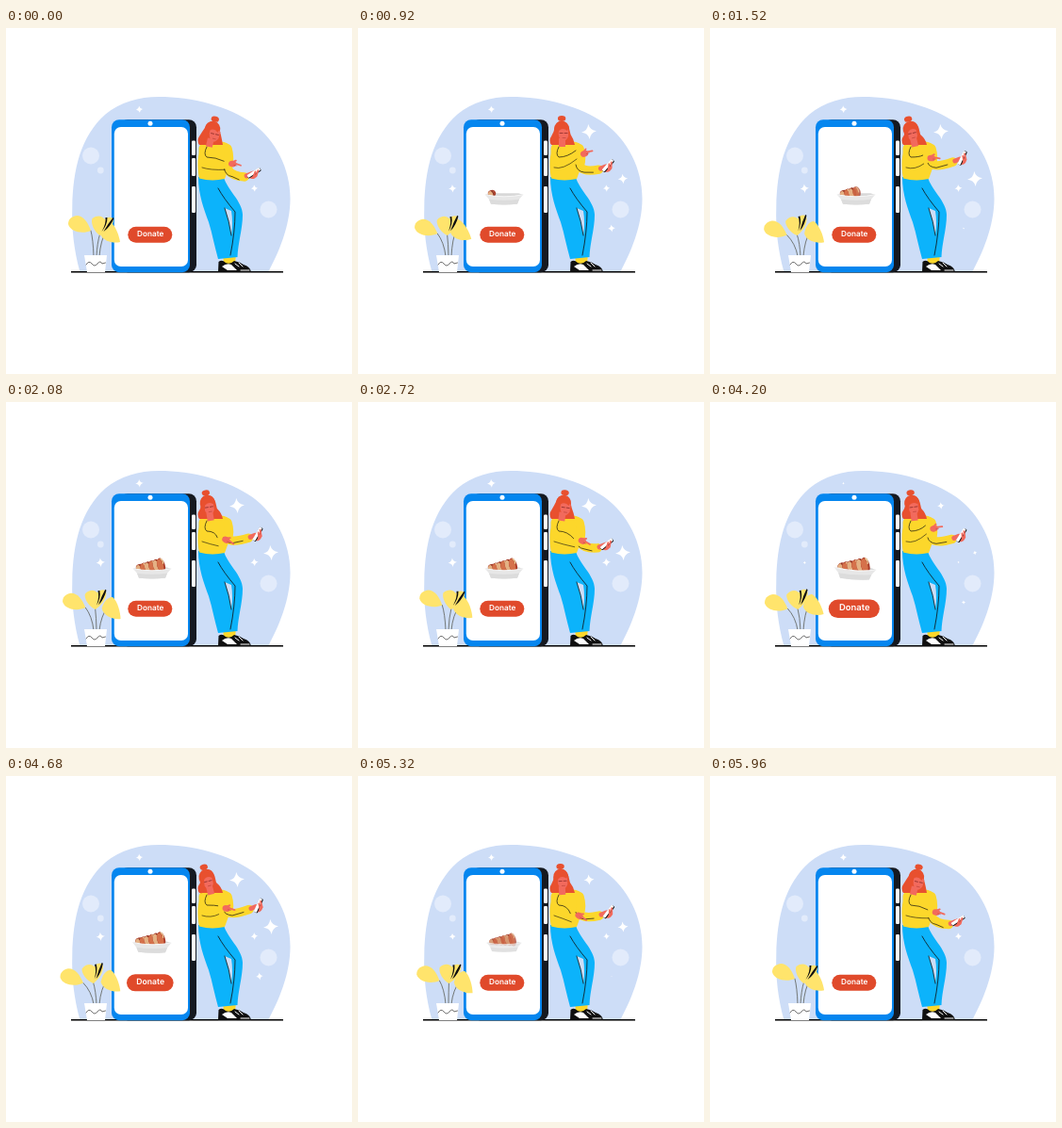
Recreate the animation shown at these times as an HTML page with a canvas. Size 367 by 367 pixels, loop 6 s.

```html
<!DOCTYPE html>
<html lang="en">
<head>
<meta charset="utf-8">
<title>Donate</title>
<style>
html, body { margin: 0; width: 100%; height: 100%; overflow: hidden; background: #fff; }
canvas { display: block; width: 367px; height: 367px; }
</style>
</head>
<body>
<canvas id="stage"></canvas>
<script>
const SIZE = 367, LOOP = 6000;
const canvas = document.getElementById('stage');
const ratio = window.devicePixelRatio || 1;
canvas.width = canvas.height = Math.round(SIZE * ratio);
const g = canvas.getContext('2d');

const BLUE = '#0586ef', DARK = '#151920', INK = '#101010', RED = '#e04a2b', SKY = '#cdddf7', HALO = '#e2ebfb';
const YELLOW = '#fcd72b', LEAF = '#ffe46c', SKIN = '#f26a5d', HAIR = '#e8502f', PANTS = '#0cb3fb';

// Motion: a 3 s swing, a smooth step and a soft bump
const wave = (t, shift = 0) => Math.cos(2 * Math.PI * (t - shift) / 3000);
const bump = (t, mid, width) => Math.exp(-(((t - mid) / width) ** 2));
function ramp(t, from, span) {
  const p = Math.min(1, Math.max(0, (t - from) / span));
  return p * p * (3 - 2 * p);
}

function fill(d, color) {
  g.fillStyle = color;
  g.fill(new Path2D(d));
}

function line(d, color = INK, width = 0.8) {
  g.strokeStyle = color;
  g.lineWidth = width;
  g.lineCap = g.lineJoin = 'round';
  g.stroke(new Path2D(d));
}

function disc(x, y, rx, color, ry = rx, turn = 0) {
  g.fillStyle = color;
  g.beginPath();
  g.ellipse(x, y, rx, ry, turn, 0, 7);
  g.fill();
}

function box(x, y, w, h, r, color) {
  g.fillStyle = color;
  g.beginPath();
  g.roundRect(x, y, w, h, r);
  g.fill();
}

function at(x, y, turn, scale, draw) {
  g.save();
  g.translate(x, y);
  g.rotate(turn);
  g.scale(scale, scale);
  draw();
  g.restore();
}

function star(x, y, r) {
  if (r < 0.1) return;
  at(x, y, -0.1, r, () => fill('M0-1Q.16-.16 1 0Q.16.16 0 1Q-.16.16-1 0Q-.16-.16 0-1Z', '#fff'));
}

function backdrop(t) {
  fill('M78.5 259C72 236 69.5 212 70.3 190C71 150 79 115 105.5 91.5C121 78.5 141 73 162 73' +
       'C198 73 236 83 261.5 101C286 119 301.5 149 301.5 181C301.5 210 289 239 278 259Z', SKY);
  disc(90, 135.5, 9, HALO);
  disc(100.3, 151, 3.4, HALO);
  disc(278.5, 192.5, 9, HALO);

  const dip = mid => 1 - 0.75 * bump(t, mid, 220);
  const bloom = born => ramp(t, born, 700) * (1 - ramp(t, 5100, 600)) * dip(4000 + born / 3);
  const steady = (3.5 + Math.sin(Math.PI * t / LOOP) ** 2) * dip(4150);
  star(141.5, 86.3, steady);
  star(263.5, 170, steady);
  star(245, 110, 8 * bloom(200));
  star(100.3, 170.3, 4.7 * bloom(350));
  star(281, 160, 8 * bloom(500));
  star(269, 212.5, 4 * (bump(t, 950, 500) + bump(t, 4600, 500)));
}

function food(t) {
  const show = ramp(t, 250, 450) * (1 - ramp(t, 5150, 500));
  if (!show) return;
  const pop = bump(t, 4200, 400);
  g.save();
  g.globalAlpha = show;
  at(155 - pop, 177.8, 0.06 * pop, 0.7 + 0.3 * show + 0.1 * pop, () => {
    fill('M-20-1L-15-2.5L15-2.5L20-1L15 3L-15 3Z', '#d8d8d8');
    // slices are laid down from left to right
    for (let i = 0; i < 6; i++) {
      const up = ramp(t, 700 + i * 230, 200);
      const h = 3.6 + i * 0.85, x = -13 + i * 4.5, y = -2.4 - i * 0.45;
      g.globalAlpha = show * up;
      disc(x, y, 4.2, '#a93b29', h, -0.3);
      disc(x - 0.8, y + 0.2, 3.2, i % 2 ? '#d5714b' : '#e4b184', h - 0.8, -0.3);
      line(`M${x - 0.5} ${y - h + 1}q2.8 2 2.6 5`, i % 2 ? '#f2d8a0' : '#8b2f22', 1.1);
    }
    g.globalAlpha = show;
    fill('M-20-1Q-10 1 0 1Q11 1 20-1L16 4L14 9Q0 10.5-14 9L-16 4Z', '#e7e7e7');
    fill('M-16 4Q0 6 16 4L14 9Q0 10.5-14 9Z', '#dcdcdc');
    line('M-20-1Q-10 1 0 1Q11 1 20-1', '#f6f6f6', 1);
  });
  g.restore();
}

function button(t) {
  at(152.8, 219.3, 0, 1 + 0.15 * bump(t, 4200, 480), () => {
    box(-23.5, -8.5, 47, 17, 8.5, RED);
    g.fillStyle = '#fff';
    g.textRendering = 'geometricPrecision';
    g.font = '600 8.2px Inter, "Open Sans", sans-serif';
    g.textAlign = 'center';
    g.fillText('Donate', 0.4, 1.4);
  });
}

function phone(t) {
  box(121, 97.2, 81, 162, 8, DARK);
  box(112, 97.2, 83, 162, 8, BLUE);
  box(114.8, 105, 78.2, 148, 7, '#fff');
  disc(153, 101.2, 2.5, '#fff');
  box(197, 119.5, 4, 15.5, 1.2, '#fff');
  box(197, 138, 4, 19, 1.2, '#fff');
  box(197, 168, 4, 28, 1.2, '#fff');
  food(t);
  button(t);
}

function leaf(x, y, turn, root, shape, marks = '') {
  line(`M${x} ${y}Q${x + (root - x) * 0.8} ${y + 9} ${root} 242`, '#4c4c40', 0.7);
  at(x, y, turn, 1, () => {
    fill(shape, LEAF);
    fill(marks, INK);
  });
}

function plant(t) {
  const c = wave(t) - 1, s = wave(t, 750);
  leaf(90 + 4.2 * c, 215 - 2.3 * c, 0.03 * c, 93,
    'M0 0C-3-9-8-16-15-16C-21-15-24-12-24-7C-22 1-9 4 0 0Z');
  leaf(106 - 2 * s, 216 - 1.5 * s, -0.12 * s, 99,
    'M-6 2C-5-5-1-11 4-11C10-7 14 4 15 11C8 13-4 10-6 2Z');
  leaf(99.5 + 3.6 * c, 219, 0.13 * c, 96,
    'M0 1C-6-3-10-12-8-17C-3-21 3-20 5-16Q9-20 14-17C16-12 10-3 0 1Z',
    'M14-18Q9-12 4-3Q11-8 15-17ZM6-18Q7-12 2-3Q8-10 8-18Z');
  fill('M83 241H107L105 259H86Z', '#fff');
  line('M85 251Q88 246 91 250T97 250T102 250L105.5 249', '#333', 0.7);
}

function legs() {
  fill('M230 240L244 239L243 250H231Z', YELLOW);
  fill('M204 158L231 158C234 171 251 184 251 198C251 213 246 228 245.5 243L225 245' +
       'C221 231 219 219 215 206C210 192 204 177 204 158Z', PANTS);
  fill('M232 191L239 194Q241 206 239 220Q237 205 232 191Z', SKY);
  line('M225 170Q231 181 243 195Q243 216 238 241M232 191Q237 205 239 220');
  fill('M225 258.8L225.5 248Q229 245 233 249Q238 251 242 247Q248 248 252 251Q259 253 260 258.8Z', INK);
  fill('M229 253Q234 249 239 251L245 257H235Z', '#fff');
  line('M243 250L247 253M247 249L251 253M249 257H258', '#fff', 1);
}

function head(v) {
  const x = 216.5 + 2.5 * v;
  fill(`M${x} 99C${x + 7} 99 ${x + 8} 109 ${x + 9} 113Q229 118 230 124H205Q202 119 205 115Q208 110 ${x - 8} 106Q${x - 6} 99 ${x} 99Z`, HAIR);
  at(216, 121, 0.25 * v, 1, () => {
    disc(0, -25, 4.2, HAIR, 3);
    disc(0, -14, 8, HAIR, 8.5);
    fill('M-3 5V-4H4V5Z', SKIN);
    at(1 + 1.5 * v, 0, 0, 1, () => {
      fill('M-5-13Q2-18 6-13V-6Q4-1 0-1Q-5-4-5-13Z', SKIN);
      line('M-3-9.5H0M2-9.5H5', '#9a3430', 0.9);
      line('M0-4.5H3', '#b73f36', 0.6);
    });
    fill('M-7-16Q0-23 7-15L6-12Q1-16-3-12Q-4-5-6 1H-10Q-8-8-7-16Z', HAIR);
  });
}

function woman(t) {
  const v = wave(t, 180);
  const px = 265.5 - 2.5 * v, py = 146 + 8.5 * v;
  const hx = 238.5 + 4.5 * wave(t, 450), hy = 141 - 8 * wave(t, 950);
  legs();
  fill('M206 123Q214 118 222 120Q233 120 237 124Q240 132 239 141L232 160Q218 163 205 159.5' +
       'Q203 151 203.5 140Z', YELLOW);

  // arm holding the phone
  const low = 152 + 5 * v;
  line(`M235 128Q238 138 235 ${147 + 3 * v}Q240 ${low + 1} ${px - 10} ${py + 4}`, YELLOW, 9.5);
  line(`M231 ${145 + 2 * v}Q232 ${low} 240 ${low + 1}L${px - 16} ${py + 7}`, INK, 0.7);
  line(`M${px - 8} ${py + 3}L${px - 3} ${py + 1}`, SKIN, 5);
  at(px, py, -(49 - 17 * v) * Math.PI / 180, 1, () => {
    disc(-2, 1, 4.8, SKIN, 4);
    box(-8, -1.9, 16, 3.8, 1, INK);
    box(-7.8, -2.3, 15.6, 3.2, 0.9, '#fff');
    line('M-3 3L2-.5M0 4L5 0', SKIN, 1.9);
  });

  // pointing arm
  line(`M209 128Q209 139 217 142L${hx - 7} ${hy + 1}`, YELLOW, 9);
  line(`M213 126Q209 134 213 137Q222 137 ${hx - 10} ${hy - 3}`, INK, 0.7);
  line(`M208 148Q217 151 ${hx - 9} ${hy + 6}`, INK, 0.6);
  at(hx, hy, 0.1 - 0.45 * wave(t, 850), 1, () => {
    disc(-1, 0, 4.2, SKIN, 3.3);
    line('M1-1L8 0M-1-2L2-4', SKIN, 1.8);
    line('M1 1L4 1', '#bd4139', 0.5);
  });
  head(v);
}

function draw(t) {
  g.setTransform(ratio, 0, 0, ratio, 0, 0);
  g.fillStyle = '#fff';
  g.fillRect(0, 0, SIZE, SIZE);
  backdrop(t);
  box(69, 258, 225, 1.6, 0, '#000');
  phone(t);
  plant(t);
  woman(t);
}

const start = performance.now();
function tick() {
  draw((performance.now() - start) % LOOP);
  requestAnimationFrame(tick);
}
tick();
</script>
</body>
</html>
```
